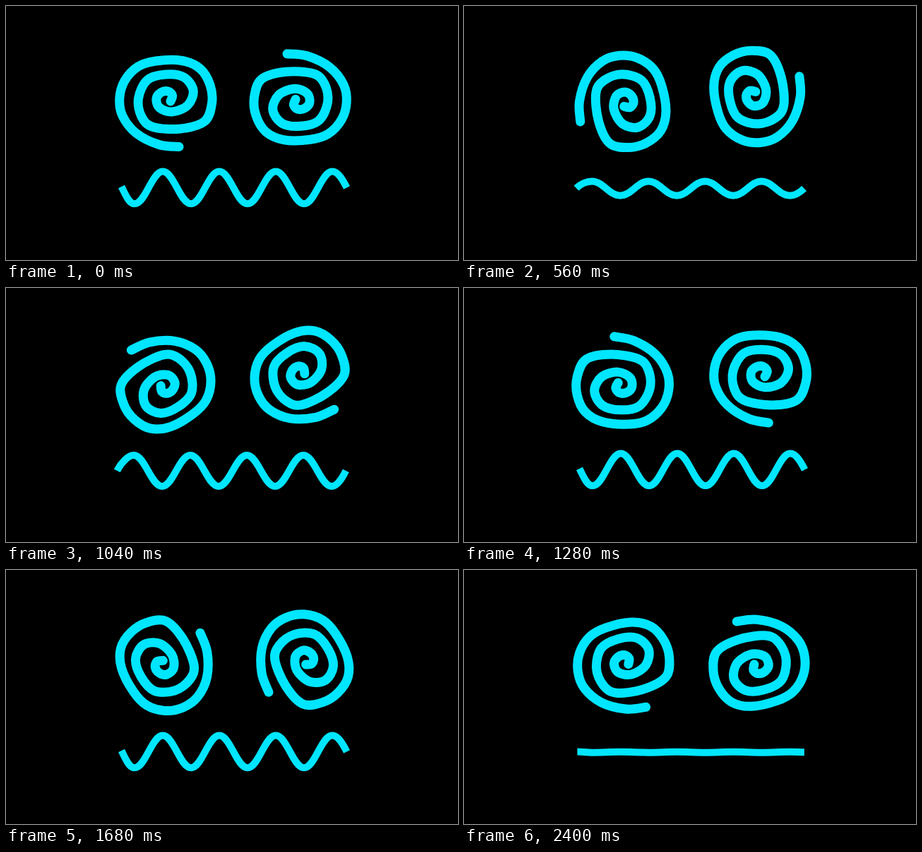
These frames come from a looping animation (640 by 360 pixels, 2.48 s). An HTML page:

```html
<!DOCTYPE html>
<html lang="en">
<head>
<meta charset="utf-8">
<title>Dizzy face</title>
<style>
  html, body { margin: 0; width: 100%; height: 100%; overflow: hidden; background: #000; }
  svg { display: block; width: 100vw; height: 100vh; }
  path { fill: none; stroke: #00e6ff; }
  .eye { stroke-width: 13; stroke-linecap: round; stroke-linejoin: round; }
  #mouth { stroke-width: 10; stroke-linejoin: round; }
</style>
</head>
<body>
<svg viewBox="0 0 640 360">
  <g transform="translate(225.6 135)"><g class="spin"><path class="eye"/></g></g>
  <g transform="translate(417.8 128.6)"><g class="spin"><path class="eye" transform="translate(-.4 3.7) rotate(180)"/></g></g>
  <path id="mouth"/>
</svg>
<script>
const LOOP = 2480, STEP = 80, STEPS = LOOP / STEP;

// Spiral from the outer tip inwards, relative to its pivot
const spiral = [
  [19.4, 64.5], [-9, 61.5], [-41, 45.5], [-60.5, 21], [-64.8, -4], [-57.6, -29],
  [-38.8, -49], [-13.5, -57], [23.4, -57.5], [49.4, -46], [63.4, -23], [65.9, 3],
  [55.6, 28.5], [21.4, 39], [-17.6, 36.5], [-33.6, 22], [-38.1, -4], [-25.6, -30],
  [0.4, -38], [26.4, -34], [39.6, -15], [31.4, 6], [9.4, 15], [-8.4, 9],
  [-12.6, -4], [-6, -12.5], [4, -14], [10, -8], [7.4, 0]
];

// Mouth extremes as start, inner turning points and end
const waveA = [[163.5, 256], ...turns(182, 280.3, 234.5), [482.5, 257.5]];
const waveB = [[157.3, 259], ...turns(181, 237, 281), [481.3, 259]];

function turns(x, first, second) {
  return Array.from({ length: 8 }, (_, i) => [x + i * 40, i % 2 ? second : first]);
}

// Catmull-Rom spline through the points
function smooth(p) {
  let d = `M${p[0]}`;
  for (let i = 0; i < p.length - 1; i++) {
    const a = p[i - 1] || p[i], b = p[i], c = p[i + 1], e = p[i + 2] || c;
    const c1 = [0, 1].map(k => b[k] + (c[k] - a[k]) / 6);
    const c2 = [0, 1].map(k => c[k] - (e[k] - b[k]) / 6);
    d += `C${c1} ${c2} ${c}`;
  }
  return d;
}

// s runs from -1 (wave A) to 1 (wave B)
function mouthPath(s) {
  const k = (s + 1) / 2;
  const p = waveA.map((a, i) => a.map((v, j) => v + (waveB[i][j] - v) * k));
  const h = 15.5, end = p.length - 1;
  let d = `M${p[0]}`;
  for (let i = 1; i <= end; i++) {
    const [x0, y0] = p[i - 1], [x1, y1] = p[i];
    const c1 = i === 1 ? [x0 + 5.5, y0 - 11 * s] : [x0 + h, y0];
    const c2 = i === end ? [x1 - 5.5, y1 + 11 * s] : [x1 - (i === 1 ? 8 : h), y1];
    if (i === end) c1[0] = x0 + 8;
    d += `C${c1} ${c2} ${x1},${y1}`;
  }
  return d;
}

// Long holds with a quick flip, twice per loop each way
function flip(n) {
  const half = STEPS / 4;
  const u = (n + STEPS - 6.75 + half / 2) / half;
  const d = (u - Math.floor(u) - 0.5) * half;
  const s = Math.sin(Math.PI / 2 * Math.max(-1, Math.min(1, d / 0.8)));
  return Math.floor(u) % 2 ? -s : s;
}

const mouth = document.getElementById('mouth');
const spins = document.querySelectorAll('.spin');
document.querySelectorAll('.eye').forEach(e => e.setAttribute('d', smooth(spiral)));

const start = performance.now();
function draw() {
  const n = Math.floor((performance.now() - start) % LOOP / STEP);
  spins.forEach(g => g.setAttribute('transform', `rotate(${n * 360 / STEPS})`));
  mouth.setAttribute('d', mouthPath(flip(n)));
  requestAnimationFrame(draw);
}
draw();
</script>
</body>
</html>
```
